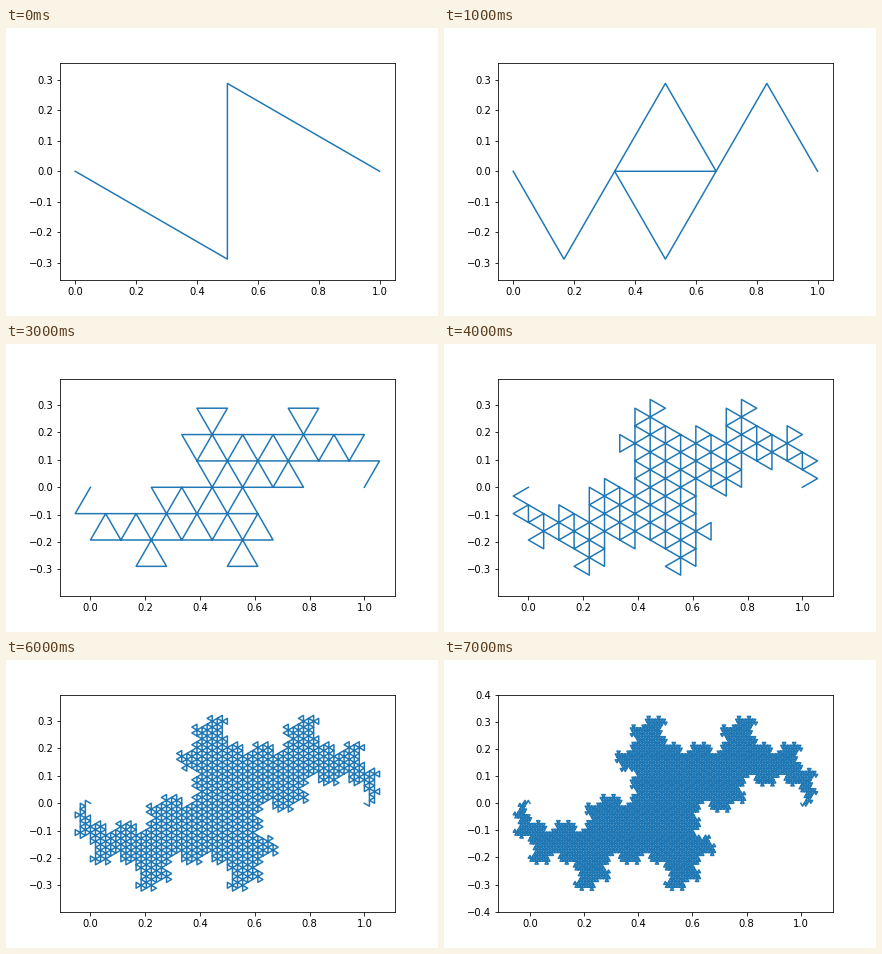
These frames come from a looping animation (432x288 px, 8 s). A matplotlib script:

```python
import numpy as np
import matplotlib.pyplot as plt
from matplotlib.animation import FuncAnimation

STEPS = 8
MARGIN = 0.05
BOX = dict(left=0.125, right=0.9, bottom=0.125, top=0.88)

fig, ax = plt.subplots(figsize=(6, 4), dpi=72, facecolor="white")
fig.subplots_adjust(**BOX)
line, = ax.plot([], [], color="#1f77b4", lw=1.5)


def terdragon(order):
    """Points of the terdragon from 0 to 1 in the complex plane."""
    first = np.exp(-1j * np.pi / 6) / np.sqrt(3)
    pattern = first * np.array([1, np.exp(2j * np.pi / 3), 1])
    steps = np.array([1 + 0j])
    for _ in range(order):
        steps = np.outer(steps, pattern).ravel()
    return np.concatenate([[0], np.cumsum(steps)])


def draw(i):
    pts = terdragon(i + 1)
    line.set_data(pts.real, pts.imag)

    # Equal scale on both axes; the curve is symmetric about (0.5, 0).
    lo, hi = pts.real.min(), pts.real.max()
    pad = MARGIN * (hi - lo)
    ax.set_xlim(lo - pad, hi + pad)
    box = ax.get_window_extent()
    half = (hi - lo + 2 * pad) * box.height / box.width / 2
    ax.set_ylim(-half, half)
    return line,


anim = FuncAnimation(fig, draw, frames=STEPS, interval=1000, repeat=True)
plt.show()
```
